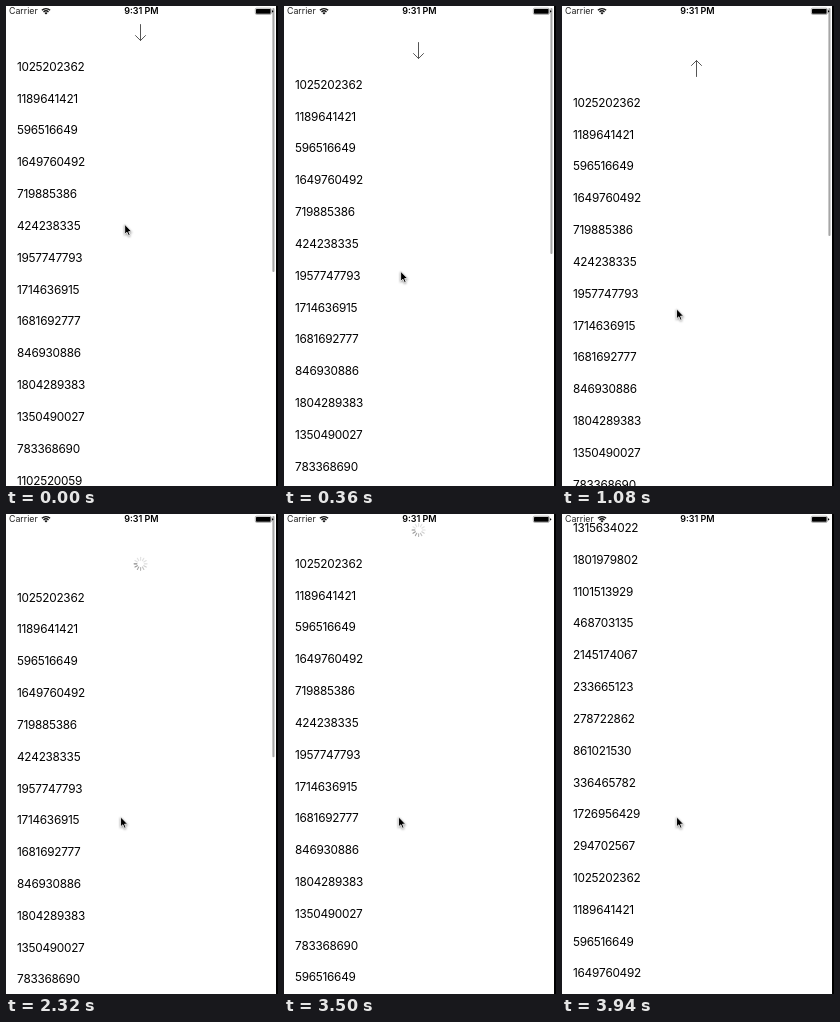
Write an HTML page that moves like this. It is 272x480 px and loops after 4340 ms.

```html
<!DOCTYPE html>
<html lang="en">
<head>
<meta charset="utf-8">
<title>Pull to refresh</title>
<style>
  html, body { margin: 0; width: 100%; height: 100%; overflow: hidden; background: #fff; }
  svg { display: block; width: 272px; height: 480px; }
  text { font-family: Inter, "Liberation Sans", sans-serif; }
  #rows { font-size: 11.8px; letter-spacing: -.27px; font-kerning: none; }
  #cursor { filter: drop-shadow(0 1px .8px #0006); }
  .line { fill: none; stroke-linecap: round; stroke-linejoin: round; }
</style>
</head>
<body>
<svg viewBox="0 0 272 480">
  <rect width="272" height="480" fill="#fff"/>
  <g id="rows"></g>
  <g id="arrow"><path class="line" stroke="#555" d="M0-8V8M-5 3L0 8L5 3"/></g>
  <g id="spinner" class="line" stroke="#888" stroke-width="1.1"></g>
  <rect id="bar" x="266.4" y="2" width="2.1" rx="1" fill="#000" fill-opacity=".35"/>
  <g id="status">
    <text x="3" y="8.2" font-size="8.8" fill="#222">Carrier</text>
    <path d="M35.9 4.3A5.8 5.8 0 0 1 44.1 4.3M37.5 6A3.6 3.6 0 0 1 42.5 6"
      fill="none" stroke="#111" stroke-width="1.3"/>
    <path d="M38.5 7.1A2.1 2.1 0 0 1 41.5 7.1L40 8.6Z"/>
    <text x="135.4" y="8.2" font-size="9" font-weight="600" text-anchor="middle">9:31 PM</text>
    <rect x="249.3" y="2.2" width="16" height="6.2" rx="1.3" fill="none" stroke="#777" stroke-width=".6"/>
    <rect x="250" y="2.9" width="14.6" height="4.8" rx=".6"/>
    <path d="M266 4.2q1.4 .3 1.4 1.1t-1.4 1.1z"/>
  </g>
  <path id="cursor" d="M0 0V10L2.3 7.9L3.9 11.4L5.5 10.7L4 7.3H7.1Z" stroke="#fff" stroke-width=".8"/>
  <rect x="270" width="2" height="480"/>
</svg>
<script>
const LOOP = 4340, PITCH = 31.82, TOP = 60.5, RELEASE = 2320, RELOAD = 3590;

// The rows hold the output of C's rand() with its default seed.
function randoms(count) {
  const r = [1];
  for (let i = 1; i < 344 + count; i++)
    r[i] = i < 31 ? 16807 * r[i - 1] % 2147483647
      : i < 34 ? r[i - 31]
      : (r[i - 3] + r[i - 31]) >>> 0;
  return r.slice(344).map(v => v >>> 1);
}
const nums = randoms(33);
const before = [...nums.slice(0, 11).reverse(), ...nums.slice(11, 22)];
const after = [...nums.slice(22).reverse(), ...before];
// Rows scrolled into view after the release already read the new data.
const mixed = [...before.slice(0, 13), ...after.slice(13)];

// time, distance pulled
const pulls = [[0, 0], [360, 18], [540, 25.5], [640, 26.5], [1080, 36]];

const $ = id => document.getElementById(id);
const clamp = v => Math.max(0, Math.min(1, v));
const ease = v => (v = clamp(v), v * v * (3 - 2 * v));
const make = (tag, parent, attrs) => {
  const el = document.createElementNS("http://www.w3.org/2000/svg", tag);
  for (const k in attrs) el.setAttribute(k, attrs[k]);
  return parent.appendChild(el);
};
const place = (id, x, y, turn = 0) =>
  $(id).setAttribute("transform", `translate(${x} ${y}) rotate(${turn})`);

const cells = Array.from({ length: 16 }, (_, i) =>
  make("text", $("rows"), { x: 11, y: i * PITCH + 4.3 }));
const spokes = Array.from({ length: 12 }, (_, i) =>
  make("path", $("spinner"), { d: "M0-3.7V-6.5", transform: `rotate(${i * 30})` }));

// Each stretch between two key points adds its share of the pull.
const pullAt = t => pulls.slice(1).reduce((sum, [end, d], i) => {
  const [start, from] = pulls[i];
  return sum + (d - from) * clamp((t - start) / (end - start));
}, 0);

function draw(t) {
  const pull = pullAt(t), busy = t >= RELEASE;
  let y = TOP + pull;
  if (busy) y -= 47 * ease((t - 2199) / 350) + 36 * ease((t - 3580) / 375);

  const data = t >= RELOAD ? after : busy ? mixed : before;
  cells.forEach((c, i) => { if (c.textContent != data[i]) c.textContent = data[i]; });
  place("rows", 0, y);

  place("arrow", 134.5, y - 34, 180 * ease((t - 565) / 250));
  place("spinner", 134.6, y - 33.5);
  $("arrow").style.display = busy ? "none" : "";
  $("spinner").style.display = busy ? "" : "none";
  const head = Math.floor(t / 100) + 10;
  spokes.forEach((s, i) =>
    s.setAttribute("opacity", Math.max(.25, 1 - (head - i) % 12 * .12)));

  $("bar").setAttribute("height", 324.5 - y);
  $("bar").setAttribute("opacity", 1 - clamp((t - 2540) / 260));
  // The list resists, so the pointer travels further than the rows.
  place("cursor", 118.7 - pull * .115, 218.2 + pull * (2.87 - pull * .0144));
}

function tick() {
  draw(performance.now() % LOOP);
  requestAnimationFrame(tick);
}
tick();
</script>
</body>
</html>
```
